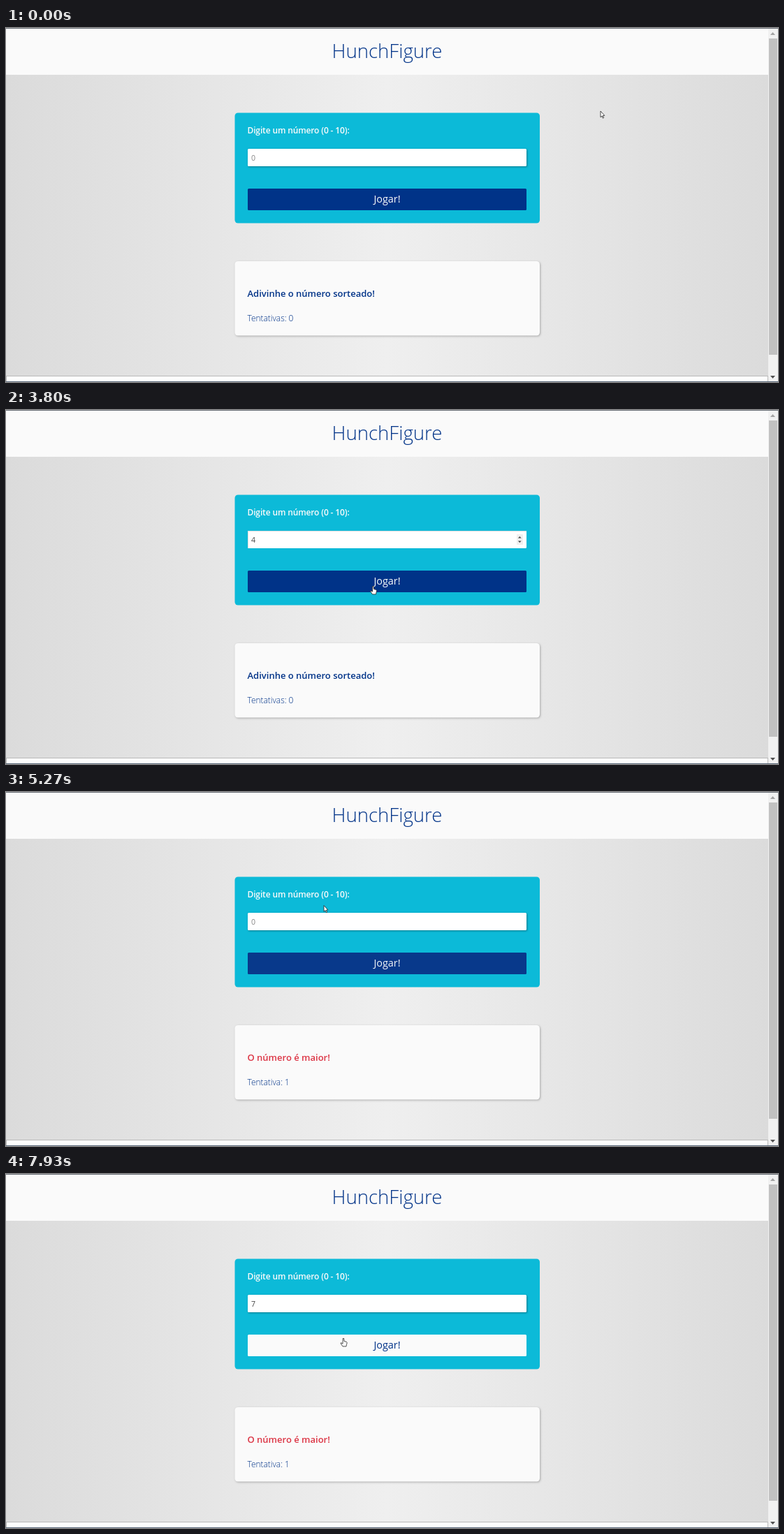
An HTML page with a canvas that plays this animation: 1105x507 px, repeating every 8000 ms.

```html
<!DOCTYPE html>
<html lang="pt-BR">
<head>
<meta charset="utf-8">
<title>HunchFigure</title>
<style>
html, body { margin: 0; width: 100%; height: 100%; overflow: hidden; background: #fafafa; }
canvas { display: block; }
</style>
</head>
<body>
<canvas id="stage" width="1105" height="507"></canvas>
<script>
const ctx = document.getElementById('stage').getContext('2d');
const LOOP = 8000, TICK = 1000 / 15;
const NAVY = '#003388', PAPER = '#fafafa', FONT = '"Open Sans", "Noto Sans", sans-serif';

// Pointer waypoints: tick, x, y
const PATH = [
  [0, 851, 119], [1, 865, 118], [2, 883, 117.5], [12, 883, 117.5],
  [15, 780, 134], [19, 535, 176], [22, 441, 194], [25, 433, 181], [51, 433, 181],
  [54, 478, 216], [57, 525.5, 252.5], [74, 525.5, 252.5], [76, 500, 222],
  [79, 455, 162.5], [83, 450, 174], [87, 452, 183], [107, 452, 183],
  [111, 479, 230.5], [114, 483, 235.5], [120, 483, 235.5]
];

function pointer(k) {
  const i = Math.max(1, PATH.findIndex(p => p[0] >= k));
  const [a, x0, y0] = PATH[i - 1], [b, x1, y1] = PATH[i];
  const p = (k - a) / (b - a);
  return { x: x0 + (x1 - x0) * p, y: y0 + (y1 - y0) * p };
}

// CSS "ease" timing curve
function ease(p) {
  if (p <= 0) return 0;
  if (p >= 1) return 1;
  let lo = 0, hi = 1;
  for (let i = 0; i < 20; i++) {
    const s = (lo + hi) / 2;
    const x = 0.75 * s * (1 - s) + s * s * s;
    if (x < p) lo = s; else hi = s;
  }
  const s = lo, r = 1 - s;
  return 0.3 * r * r * s + 3 * r * s * s + s * s * s;
}

const fade = (k, start) => ease((k - start) * TICK / 300);
const mix = (a, b, p) => `rgb(${a.map((v, i) => Math.round(v + (b[i] - v) * p))})`;
const inside = (p, x, y, w, h) => p.x >= x && p.x <= x + w && p.y >= y && p.y <= y + h;

function rect(x, y, w, h, fill) {
  ctx.fillStyle = fill;
  ctx.fillRect(x, y, w, h);
}

function box(x, y, w, h, r, fill, shadow) {
  ctx.save();
  if (shadow) {
    ctx.shadowColor = shadow;
    ctx.shadowOffsetX = ctx.shadowOffsetY = 1;
    ctx.shadowBlur = 3;
  }
  ctx.beginPath();
  ctx.roundRect(x, y, w, h, r);
  ctx.fillStyle = fill;
  ctx.fill();
  ctx.restore();
}

function text(str, x, y, size, weight, color, align = 'left', spacing = 0) {
  ctx.font = `${weight} ${size}px ${FONT}`;
  ctx.letterSpacing = spacing + 'px';
  ctx.textAlign = align;
  ctx.fillStyle = color;
  ctx.fillText(str, x, y);
}

function triangle(x, y, w, h, color) {
  ctx.beginPath();
  ctx.moveTo(x - w, y + h);
  ctx.lineTo(x + w, y + h);
  ctx.lineTo(x, y);
  ctx.fillStyle = color;
  ctx.fill();
}

function outline(points, x, y) {
  ctx.beginPath();
  points.forEach(([px, py]) => ctx.lineTo(x + px, y + py));
  ctx.closePath();
  ctx.fillStyle = '#fff';
  ctx.fill();
  ctx.strokeStyle = '#222';
  ctx.lineWidth = 0.8;
  ctx.lineJoin = 'round';
  ctx.stroke();
}

const ARROW = [[0, 0], [0, 8.8], [2, 7], [3.3, 10.2], [4.6, 9.6], [3.3, 6.6], [5.8, 6.4]];
const HAND = [[-0.8, 0], [0.7, 0], [1, 4], [4.4, 4.9], [5.2, 6.2], [4.4, 9], [4, 11.4],
  [-1, 11.4], [-3.8, 7.4], [-3.6, 6.2], [-1, 7.6]];

function drawPointer(p, overInput, overButton) {
  if (overButton) return outline(HAND, p.x, p.y);
  if (!overInput) return outline(ARROW, p.x, p.y);
  const x = Math.round(p.x), y = Math.round(p.y);
  rect(x, y - 5, 1, 10, '#333');
  rect(x - 2, y - 6, 2, 1, '#444');
  rect(x + 1, y - 6, 2, 1, '#444');
  rect(x - 2, y + 5, 2, 1, '#444');
  rect(x + 1, y + 5, 2, 1, '#444');
}

function drawPage() {
  rect(0, 0, 1105, 507, PAPER);
  const g = ctx.createLinearGradient(0, 0, 1091, 0);
  g.addColorStop(0, '#dbdbdb');
  g.addColorStop(0.5, '#efefef');
  g.addColorStop(1, '#dbdbdb');
  rect(0, 67, 1091, 431, g);
  text('HunchFigure', 545.5, 43, 27.6, 300, NAVY, 'center');

  rect(0, 498, 1091, 8, '#b9b9b9');
  rect(1, 499, 1089, 7, '#fdfdfd');

  rect(1091, 0, 14, 507, '#f1f1f1');
  rect(1092, 15, 12, 453, '#c1c1c1');
  triangle(1097.5, 6, 3.5, 4, '#a3a3a3');
  triangle(1097.5, 502, 3.5, -4, '#505050');
  rect(0, 0, 1105, 1, '#6b7078');
  rect(0, 506, 1105, 1, '#5c6b7c');
}

function drawInput(value, focused, hovered, caret) {
  box(346, 173, 399, 25, 1.5, '#fff', focused ? null : 'rgba(0,0,0,.35)');
  if (focused) {
    rect(346, 173, 399, 1, '#dcdfe0');
    rect(346, 173, 1, 25, '#dcdfe0');
  }
  text(value || '0', 351, 189.5, 10.6, 400, value ? '#444' : '#858585');
  if (caret) rect(value ? 357 : 351, 179, 1, 13, '#222');
  if (focused || hovered) {
    rect(731, 178, 9, 15, '#f0f0f0');
    triangle(735.3, 181, 2.4, 2.6, '#444');
    triangle(735.3, 190, 2.4, -2.6, '#444');
  }
}

function draw(t) {
  const k = Math.floor((t + 4) / TICK);
  const p = pointer(k);
  const overInput = inside(p, 346, 173, 399, 25);
  const overButton = inside(p, 346, 230, 399, 31);
  const focused = (k >= 25 && k < 64) || (k >= 88 && k < 119);
  const value = k >= 48 && k < 65 ? '4' : k >= 105 ? '7' : '';
  const blinkFrom = k >= 105 ? 105 : k >= 88 ? 88 : k >= 48 ? 48 : 25;
  const caret = focused && Math.floor((k - blinkFrom) / 8) % 2 === 0;
  const lit = fade(k, 57) - fade(k, 75.5) + fade(k, 110.5);
  const guessed = k >= 65;

  drawPage();
  box(327.5, 121.5, 436.5, 158, 4.5, '#0cbad8');
  text('Digite um número (0 - 10):', 345.5, 150.8, 12, 600, PAPER, 'left', -0.14);
  drawInput(value, focused, overInput, caret);

  const blue = [0, 51, 136], pale = [250, 250, 250];
  box(346, 230, 399, 31, 1.5, mix(blue, pale, lit));
  text('Jogar!', 545.5, 250, 14.4, 400, mix(pale, blue, lit), 'center');

  box(327.5, 334, 436.5, 106.5, 4.5, PAPER, 'rgba(0,0,0,.28)');
  text(guessed ? 'O número é maior!' : 'Adivinhe o número sorteado!',
    345.5, 384.6, 13, 600, guessed ? '#dc3545' : NAVY);
  text(guessed ? 'Tentativa: 1' : 'Tentativas: 0', 345.5, 419.5, 11.9, 300, NAVY);

  drawPointer(p, overInput, overButton);
}

const start = performance.now();
function frame() {
  draw((performance.now() - start) % LOOP);
  requestAnimationFrame(frame);
}
frame();
</script>
</body>
</html>
```
